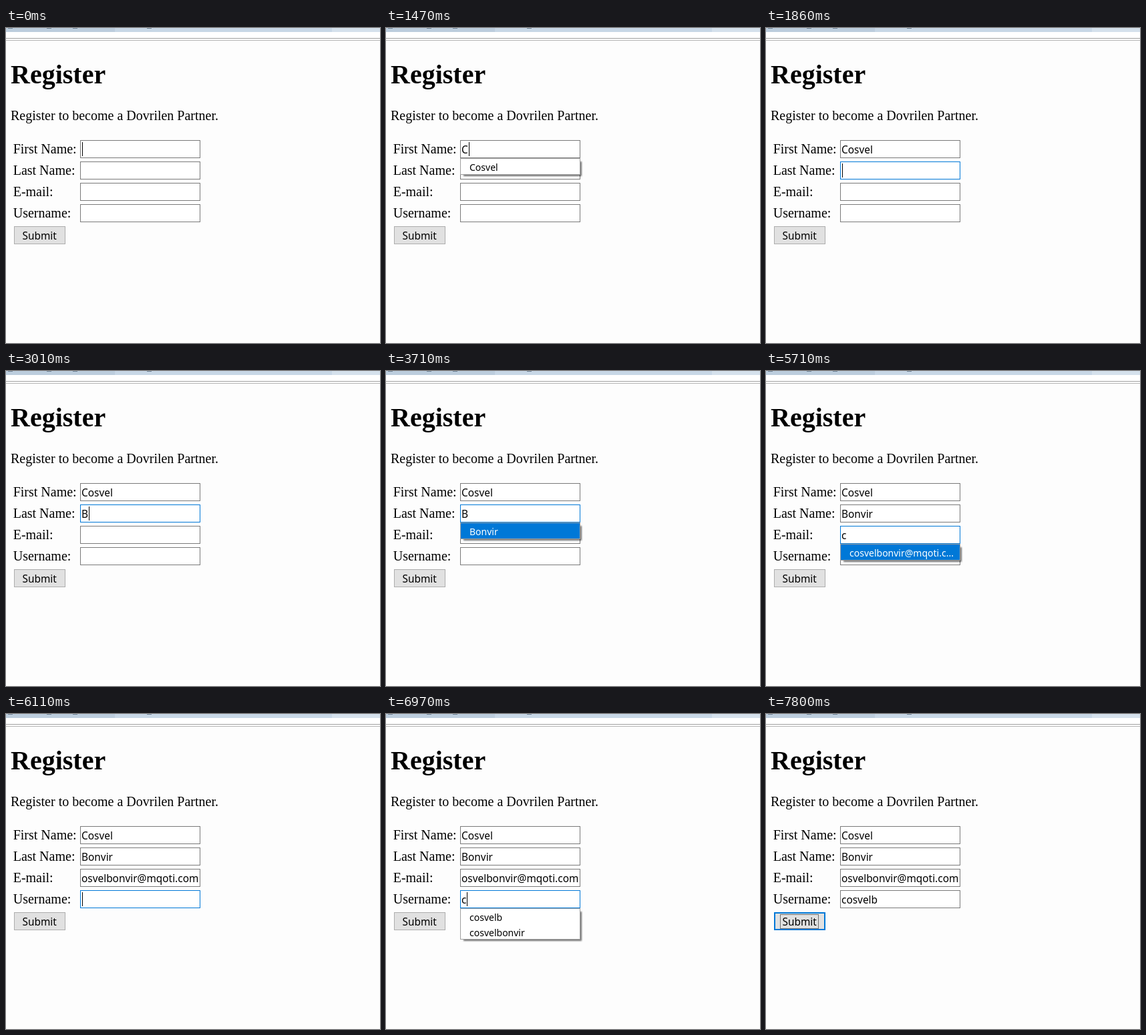
An HTML page for the animation above (8000 ms loop, 560x472 px).

```html
<!DOCTYPE html>
<html lang="en">
<head>
<meta charset="utf-8">
<title>Register</title>
<style>
  html, body { margin: 0; width: 100%; height: 100%; overflow: hidden; background: #fdfdfd; }
  svg { display: block; }
  text { font: 20px "Liberation Serif", serif; white-space: pre; }
  .title { font-size: 40px; font-weight: bold; }
  .ui { font: 15.4px "Noto Sans", sans-serif; }
  .item { font: 14px "Noto Sans", sans-serif; }
  .shadow { filter: blur(1px); }
</style>
</head>
<body>
<svg id="stage" width="560" height="472"></svg>
<script>
const LOOP = 8000, BLUE = '#0078d7';
const FIRST = 'Cosvel', LAST = 'Bonvir', USER = 'cosvelb';
const EMAIL = 'cosvelbonvir@mqoti.com';
const labels = ['First Name:', 'Last Name:', 'E-mail:', 'Username:'];
const menus = [[FIRST], [LAST], [EMAIL.slice(0, -2) + '...'], [USER, 'cosvelbonvir']];

// Each step changes part of the state; keys 0-3 hold the field values.
const START = { 0: '', 1: '', 2: '', 3: '', focus: 0, caret: 114, menu: -1, picked: false, alpha: 1 };
const closed = { menu: -1, picked: false, alpha: 1 };
const steps = [
  [160, { caret: 0 }],
  [310, { 0: 'C', caret: 124 }],
  [450, { menu: 0 }],
  [880, { caret: 0 }],
  [1470, { caret: 124 }],
  [1590, { picked: true }],
  [1860, { 0: FIRST, focus: 1, caret: 114, ...closed }],
  [2420, { caret: 0 }],
  [3010, { 1: 'B', caret: 124 }],
  [3130, { menu: 1 }],
  [3560, { caret: 0 }],
  [3710, { picked: true }],
  [3990, { 1: LAST, focus: 2, caret: 114, alpha: 0.5 }],
  [4120, closed],
  [4570, { caret: 0 }],
  [5130, { 2: 'c', caret: 121, menu: 2 }],
  [5570, { caret: 0 }],
  [5710, { picked: true }],
  [6110, { 2: EMAIL.slice(1), focus: 3, caret: 114, ...closed }],
  [6680, { caret: 0 }],
  [6830, { 3: 'c', caret: 121 }],
  [6970, { menu: 3 }],
  [7400, { picked: true, caret: 0 }],
  [7800, { 3: USER, focus: 4, ...closed }]
];

const rowY = i => 168 + 32 * i;
const fill = (x, y, w, h, color, extra = '') =>
  `<rect x="${x}" y="${y}" width="${w}" height="${h}" fill="${color}" ${extra}/>`;
const box = (x, y, w, h, color, edge, line = 1, extra = '') =>
  fill(x + line / 2, y + line / 2, w - line, h - line, color,
    `stroke="${edge}" stroke-width="${line}" ${extra}`);
const text = (x, y, str, cls = '', color = '#000') =>
  `<text x="${x}" y="${y}" class="${cls}" fill="${color}">${str}</text>`;

function page() {
  return fill(0, 0, 560, 6, '#c8d7e6') + fill(0, 0, 163, 6, '#bccddd') +
    fill(488, 0, 72, 6, '#d5e1ec') +
    [3, 61, 100, 211].map(x => fill(x, 0, 7, 1, '#6f8294')).join('') +
    fill(0, 6, 560, 9, '#fff') +
    fill(0, 15, 560, 1, '#a0a0a0') + fill(0, 18, 560, 1, '#b4b4b4') +
    text(7, 83, 'Register', 'title') +
    text(7, 138, 'Register to become a Dovrilen Partner.');
}

function field(s, i) {
  const y = rowY(i), active = i > 0 && i === s.focus;
  return text(10.7, y + 20, labels[i]) +
    box(111, y, 180, 27, '#fff', active ? BLUE : '#7a7a7a') +
    text(113, y + 20, s[i], 'ui');
}

function button(focused) {
  const ring = box(21, 300, 58, 22, 'none', '#000', 1, 'stroke-dasharray="1 1"');
  return box(12, 297, 77, 27, '#e1e1e1', focused ? BLUE : '#adadad', focused ? 2 : 1) +
    text(24.5, 317, 'Submit', 'ui') + (focused ? ring : '');
}

function menu(s) {
  const items = menus[s.menu];
  if (!items) return '';
  const y = rowY(s.menu) + 27, h = items.length > 1 ? 47 : 25;
  const rows = items.map((str, k) =>
    text(125, y + 19 + 23 * k, str, 'item', s.picked && !k ? '#fff' : '#000'));
  return `<g opacity="${s.alpha}">` +
    fill(116, y + 5, 177, h - 3, '#000', 'opacity=".55" class="shadow"') +
    box(111, y, 180, h, '#fff', '#a0a0a0') +
    (s.picked ? fill(112, y + 1, 178, 23, BLUE) : '') + rows.join('') + '</g>';
}

function draw(s) {
  const fields = labels.map((_, i) => field(s, i)).join('');
  const caret = s.caret ? fill(s.caret, rowY(s.focus) + 3, 1, 21, '#000') : '';
  return page() + fields + button(s.focus === 4) + caret + menu(s);
}

const stage = document.getElementById('stage');
let shown = -1;

function tick(now) {
  const t = now % LOOP;
  const past = steps.filter(([at]) => at <= t);
  if (past.length !== shown) {
    shown = past.length;
    stage.innerHTML = draw(Object.assign({}, START, ...past.map(step => step[1])));
  }
  requestAnimationFrame(tick);
}
tick(performance.now());
</script>
</body>
</html>
```
